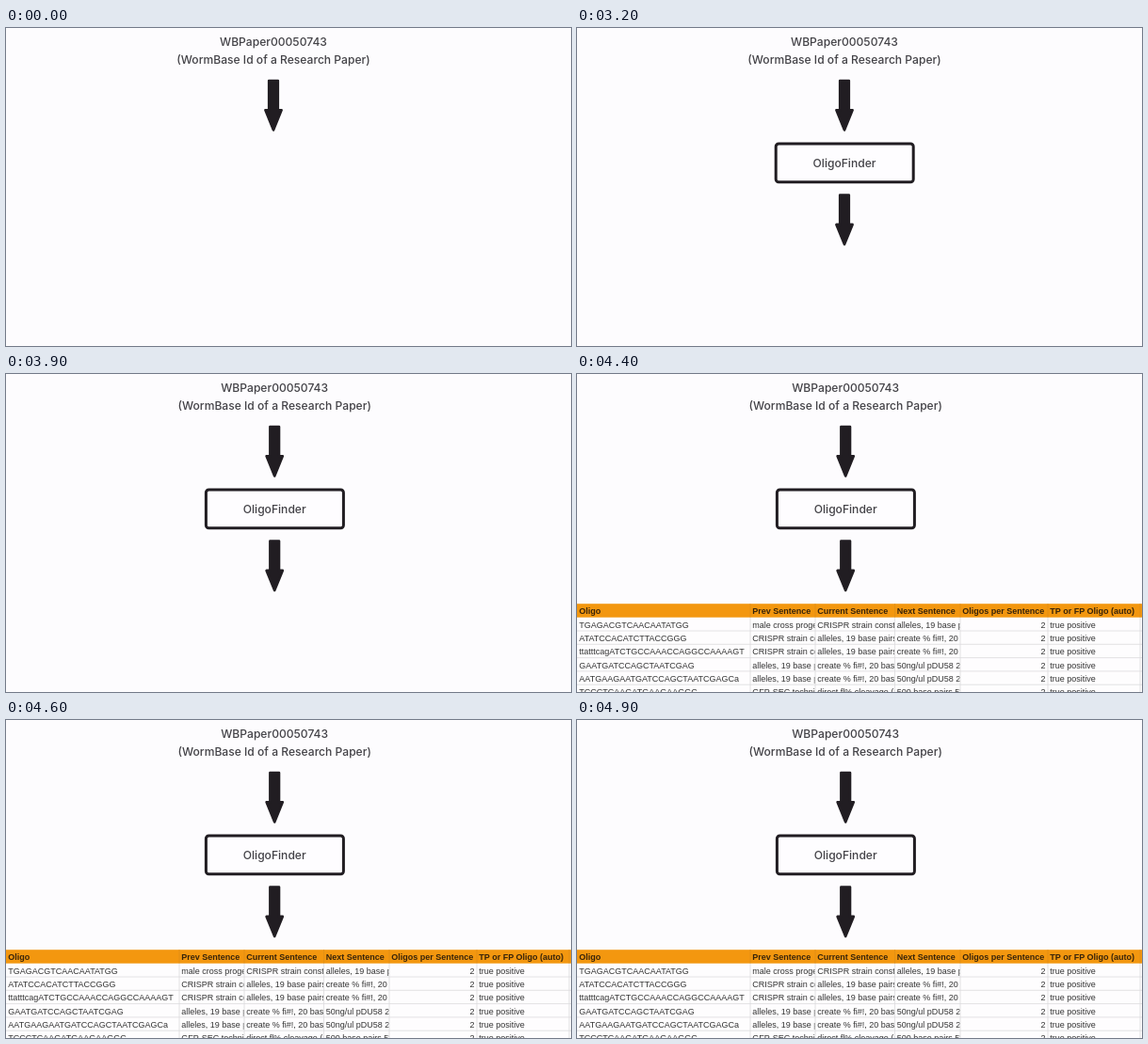
An HTML page that plays this animation: 600x338 px, repeating every 5 s.

```html
<!DOCTYPE html>
<html lang="en">
<head>
<meta charset="utf-8">
<title>OligoFinder flow</title>
<style>
  html, body { margin: 0; width: 100%; height: 100%; overflow: hidden; background: #fdfcfe; }
  svg { display: block; width: 100%; height: 100%; }
  .label { font: 500 12.1px Inter, sans-serif; fill: #434247; text-anchor: middle; }
  .cell { font: 9px "Liberation Sans", Arial, sans-serif; fill: #333; }
  .head { font-weight: 700; fill: #38240a; }
  .num { text-anchor: end; }
</style>
</head>
<body>
<svg viewBox="0 0 600 338">
  <defs>
    <path id="arrow" d="M-4.8 1.2H4.8V32.5H8.6L0 53.6L-8.6 32.5H-4.8Z"
      fill="#211d22" stroke="#211d22" stroke-width="2.6" stroke-linejoin="round"/>
  </defs>
  <rect width="600" height="338" fill="#fdfcfe"/>
  <g id="flow">
    <text class="label" x="284" y="19.4">WBPaper00050743</text>
    <text class="label" x="284" y="38">(WormBase Id of a Research Paper)</text>
    <use href="#arrow" x="284" y="54.8"/>
    <g id="box">
      <rect x="211.2" y="122.9" width="146" height="40.8" rx="3" fill="#fefdff" stroke="#211d22" stroke-width="3"/>
      <text class="label" x="284" y="147.8">OligoFinder</text>
    </g>
    <use id="next" href="#arrow" x="284" y="176.4"/>
  </g>
  <g id="table"></g>
</svg>
<script>
const LOOP = 5000, TOP = 244.2, HEAD = 14.5, ROW = 14.3;
const edges = [0, 184, 253, 337.5, 407, 500, 598];
const heads = ["Oligo", "Prev Sentence", "Current Sentence", "Next Sentence", "Oligos per Sentence", "TP or FP Oligo (auto)"];
const rows = [
  ["TGAGACGTCAACAATATGG", "male cross progeny", "CRISPR strain construct", "alleles, 19 base pairs"],
  ["ATATCCACATCTTACCGGG", "CRISPR strain construct", "alleles, 19 base pairs", "create % fi#!, 20 base"],
  ["ttatttcagATCTGCCAAACCAGGCCAAAAGT", "CRISPR strain construct", "alleles, 19 base pairs", "create % fi#!, 20 base"],
  ["GAATGATCCAGCTAATCGAG", "alleles, 19 base pairs", "create % fi#!, 20 base", "50ng/ul pDU58 20"],
  ["AATGAAGAATGATCCAGCTAATCGAGCa", "alleles, 19 base pairs", "create % fi#!, 20 base", "50ng/ul pDU58 20"],
  ["TCCCTCAAGATGAAGAAGGC", "GFP-SEC technique", "direct fl% cleavage (20", "500 base pairs 5'"]
];

const $ = id => document.getElementById(id);
function add(parent, tag, attrs, text = "") {
  const el = document.createElementNS("http://www.w3.org/2000/svg", tag);
  for (const k in attrs) el.setAttribute(k, attrs[k]);
  el.textContent = text;
  return parent.appendChild(el);
}

function buildTable() {
  const table = $("table"), body = TOP + HEAD;
  add(table, "rect", { y: TOP, width: 600, height: 94, fill: "#fefdfe" });
  add(table, "rect", { y: TOP, width: 600, height: HEAD, fill: "#f3970f" });
  const line = (d, stroke = "#dcdbdd") => add(table, "path", { d, stroke, "stroke-width": 0.8 });
  rows.forEach((_, i) => i && line(`M0 ${body + i * ROW}H600`));
  edges.slice(1).forEach(x => {
    line(`M${x} ${body}V338`);
    line(`M${x} ${TOP}V${body}`, "#dd8f18");
  });

  // Each column clips its own overflowing text.
  heads.forEach((head, c) => {
    const x = edges[c], right = edges[c + 1];
    const clip = add(table, "clipPath", { id: "col" + c });
    add(clip, "rect", { x, y: TOP, width: right - x - 0.5, height: 94 });
    const col = add(table, "g", { "clip-path": `url(#col${c})` });
    add(col, "text", { class: "cell head", x: x + 2.3, y: 255.2 }, head);
    rows.forEach((row, r) => {
      const num = c === 4;
      const text = num ? "2" : c === 5 ? "true positive" : row[c];
      add(col, "text", { class: num ? "cell num" : "cell", x: num ? right - 2.5 : x + 2.3, y: 269.6 + r * ROW }, text);
    });
  });
}

function show(id, on) { $(id).setAttribute("visibility", on ? "visible" : "hidden"); }

function render(t) {
  show("box", t >= 800);
  show("next", t >= 3200);
  show("table", t >= 4300);
  $("flow").setAttribute("transform", `translate(${t >= 3900 ? 1.2 : 0} 0)`);
}

buildTable();
render(0);
let start;
function tick(now) {
  start ??= now;
  render((now - start) % LOOP);
  requestAnimationFrame(tick);
}
requestAnimationFrame(tick);
</script>
</body>
</html>
```
